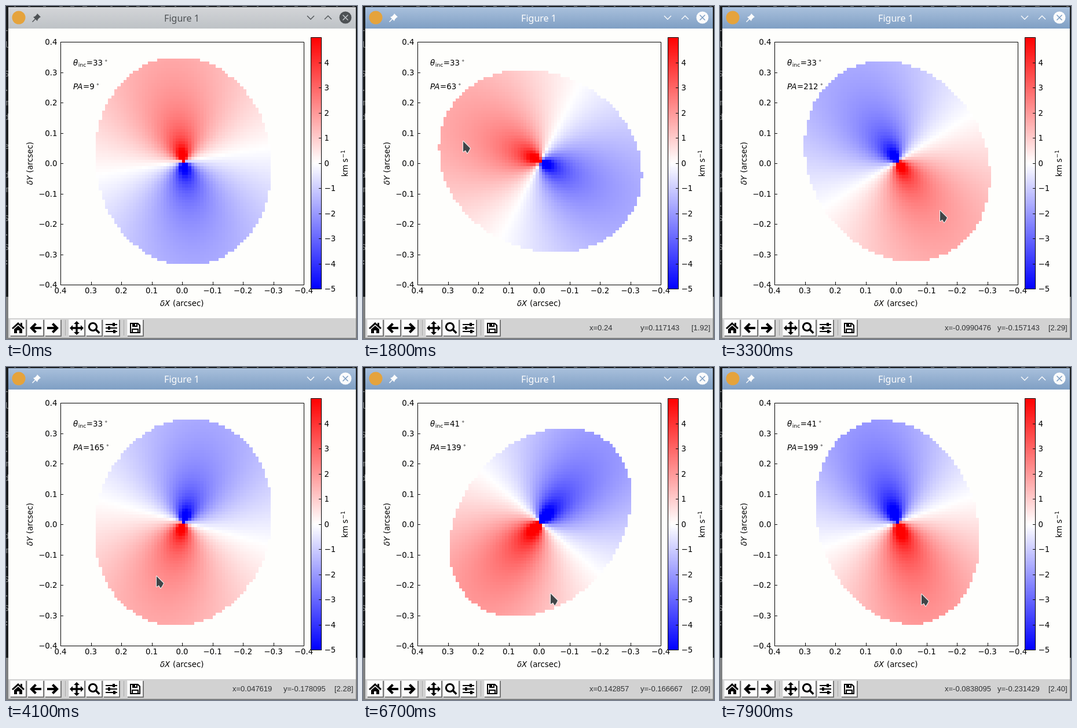
These frames come from a looping animation (606 by 576 pixels, 8000 ms). An HTML page with a canvas:

```html
<!DOCTYPE html>
<html lang="en">
<head>
<meta charset="utf-8">
<title>Figure 1</title>
<style>
html, body { margin: 0; width: 100%; height: 100%; overflow: hidden; background: #000; }
canvas { display: block; }
</style>
</head>
<body>
<canvas id="stage" width="606" height="576"></canvas>
<script>
const g = document.getElementById('stage').getContext('2d');
const LOOP = 8000, STEP = 100, FOCUS = 400, LAG = 150;
const SANS = '"DejaVu Sans", sans-serif';
const RAD = Math.PI / 180;
const CELL = 5.305, CX = 306.3, CY = 268.6, RADIUS = 180.75, PX_PER_ARCSEC = 525;

// Pointer during the drag: time, x, y
const DRAG = [
  [400, 284, 147.5], [900, 362, 160.5], [1100, 362, 160.5], [1250, 324, 150.5],
  [1800, 178, 210.5], [2200, 165, 275.5], [2600, 278, 354.5], [2800, 278, 354.5],
  [3450, 380, 354.5], [4100, 279, 365.5], [4500, 229, 359.5], [6700, 229, 359.5],
  [6850, 324, 392.5], [7100, 400, 366.5], [7700, 348, 393.5]
];
// Inclination set by scrolling: time, degrees
const TILT = [[4700, 33], [5200, 39], [6000, 43], [6500, 41]];

// Linear interpolation in rows of [time, ...values]
function at(rows, t) {
  const i = rows.findIndex(r => r[0] > t);
  if (i === 0) return rows[0].slice(1);
  if (i < 0) return rows[rows.length - 1].slice(1);
  const a = rows[i - 1], b = rows[i], f = (t - a[0]) / (b[0] - a[0]);
  return a.slice(1).map((v, j) => v + (b[j + 1] - v) * f);
}

// Blue – white – red over ±5 km/s
function colour(v) {
  const c = Math.round(255 * (1 - Math.min(Math.abs(v), 5) / 5));
  return v > 0 ? `rgb(255,${c},${c})` : `rgb(${c},${c},255)`;
}

const speed = (r, inc) => 1.83 * Math.sin(inc * RAD) / Math.sqrt(r / PX_PER_ARCSEC);

function rect(x, y, w, h, fill) {
  g.fillStyle = fill;
  g.fillRect(x, y, w, h);
}

function text(s, x, y, font, align = 'left', fill = '#000') {
  g.font = font;
  g.textAlign = align;
  g.fillStyle = fill;
  g.fillText(s, x, y);
}

function line(d, stroke, width = 1) {
  g.strokeStyle = stroke;
  g.lineWidth = width;
  g.stroke(new Path2D(d));
}

function shape(d, x, y, fill) {
  g.save();
  g.translate(x, y);
  g.fillStyle = fill;
  g.fill(new Path2D(d), 'evenodd');
  g.restore();
}

function disc(x, y, r, fill) {
  g.beginPath();
  g.arc(x, y, r, 0, 7);
  g.fillStyle = fill;
  g.fill();
}

// Runs of [string, style, scale, rise]; centred when asked
function formula(runs, x, y, centred) {
  const fonts = runs.map(([, style, k = 1]) => `${style} ${13.33 * k}px ${SANS}`);
  const widths = runs.map(([s], i) => (g.font = fonts[i], g.measureText(s).width + .5));
  if (centred) x -= widths.reduce((a, b) => a + b) / 2;
  runs.forEach(([s, , , rise = 0], i) => {
    text(s, x, y - rise, fonts[i]);
    x += widths[i];
  });
}

function upright(runs, x, y) {
  g.save();
  g.translate(x, y);
  g.rotate(-Math.PI / 2);
  formula(runs, 0, 0, true);
  g.restore();
}

function terminal() {
  const ink = '#85888a', font = '14px "DejaVu Sans Mono", monospace';
  rect(0, 0, 606, 576, '#1b1e20');
  rect(0, 503, 606, 73, '#7f8182');
  [...'-l S.md e dm.S.S:'].forEach((c, i) => text(c, -3, 47 + i * 25, font, 'left', ink));
  for (let i = 0; i < 26; i++) rect(14 + i * 23 + i * i % 11, 0, 3 + i * 7 % 6, 1, ink);
}

function titleBar(active) {
  const [top, low, ink] = active ? ['#a9c0dc', '#7f9fc4', '#fcfcfc'] : ['#d3d5d8', '#bec2c6', '#4d5154'];
  const bar = g.createLinearGradient(0, 2, 0, 39);
  bar.addColorStop(0, top);
  bar.addColorStop(1, low);
  rect(4, 2, 600, 37, bar);
  disc(22, 20, 11.5, '#e5a33c');
  shape('M2-7L8-1 6 0 3 3 2 6-1 3-6 8-7 7-2 2-5-1-2-2 1-5Z', 52, 20, ink);
  text('Figure 1', 303.5, 27, '16px "Noto Sans", sans-serif', 'center', ink);
  line('M520 17l6 6 6-6M550 23l6-6 6 6', ink, 1.4);
  disc(586, 20, 10.5, ink);
  line('M581.5 15.5l9 9m0-9l-9 9', low, 1.6);
}

const ICONS = [
  'M-11 0L0-10 4-6V-9H7V-4L11 0 9 2 0-6-9 2ZM-7 2L0-4 7 2V9H2V4H-2V9H-7Z',
  'M-10 0L-1-9 2-6-2-2H10V2H-2L2 6-1 9Z',
  'M10 0L1-9-2-6 2-2H-10V2H2L-2 6 1 9Z',
  'M0-12L5-7H1.7V-1.7H7V-5L12 0 7 5V1.7H1.7V7H5L0 12-5 7H-1.7V1.7H-7V5L-12 0-7-5V-1.7H-1.7V-7H-5Z',
  'M-2-10A8 8 0 1 0 2.5 4.5L8 10 10.5 7.5 5 2A8 8 0 0 0-2-10ZM-2-7A5 5 0 1 1-2 3 5 5 0 1 1-2-7Z',
  'M-10-7H2V-9H6V-7H10V-5H6V-3H2V-5H-10ZM-10-1H-6V-3H-2V-1H10V1H-2V3H-6V1H-10ZM-10 5H3V3H7V5H10V7H7V9H3V7H-10Z',
  'M-9-9H5L9-5V9H-9ZM-7-7V7H-6V1H6V7H7V-4L4-7V-2H-5V-7ZM0-7V-4H2V-7ZM-4 3V7H4V3Z'
];

function toolBar() {
  rect(4, 540, 600, 34, '#d2d2d2');
  ICONS.forEach((d, i) => {
    const x = 21 + 30 * i + 11 * Math.floor(i / 3);   // groups of three
    rect(x - 13, 543, 28, 29, '#777');
    rect(x - 14, 542, 27, 28, '#eee');
    rect(x - 13, 543, 26, 27, '#fcfcfc');
    shape(d, x, 557, '#000');
  });
  line('M102.5 543v27M203.5 543v27', '#aaa');
}

function axes() {
  const font = `13.33px ${SANS}`, minus = s => s.replace('-', '−');
  for (let i = 0; i <= 8; i++) {
    const p = 52.5 * i, s = minus(((4 - i) / 10).toFixed(1));
    text(s, 88.5, Math.round(67 + p), font, 'right');
    text(s, 94 + p, 497, font, 'center');
    line(`M94 ${Math.round(62 + p) + .5}h5M${Math.round(94 + p) + .5} 482v-5`, '#000');
  }
  line('M94.5 62.5h420v420h-420z', '#000');
  formula([['δX', 'italic'], [' (arcsec)', '']], 304, 519, true);
  upright([['δY', 'italic'], [' (arcsec)', '']], 46, 272);

  for (let y = 54; y < 489; y++) rect(526, y, 19, 1, colour(5 - (y - 54) / 43.5));
  for (let v = 4; v >= -5; v--) {
    const y = Math.round(271.5 - v * 43.5);
    text(minus(String(v)), 549.5, y + 5, font);
    line(`M545 ${y + .5}h-5`, '#000');
  }
  line('M526.5 54.5h18v435h-18z', '#000');
  upright([['km s', ''], ['−1', '', .7, 5]], 590, 272);
}

// Line-of-sight speed of an inclined rotating disc, cell by cell
function velocityMap(pa, inc) {
  const c = Math.cos(pa * RAD), s = Math.sin(pa * RAD), squash = Math.cos(inc * RAD);
  const edge = (mid, n) => Math.round(mid + (n - .5) * CELL);
  for (let j = -34; j <= 34; j++) for (let i = -34; i <= 34; i++) {
    const dx = -i * CELL, dy = -j * CELL + .001;
    const u = dx * s + dy * c, w = (dx * c - dy * s) / squash;
    const r = Math.hypot(u, w);
    if (r > RADIUS) continue;
    const x = edge(CX, i), y = edge(CY, j);
    rect(x, y, edge(CX, i + 1) - x, edge(CY, j + 1) - y, colour(speed(r, inc) * u / r));
  }
}

function status(x, y, inc) {
  const font = '13px "Liberation Sans", Arial, sans-serif', ink = '#303234';
  const coord = px => String(+(px / PX_PER_ARCSEC).toPrecision(6));
  const sx = coord(304 - x), long = sx.replace('-', '').length > 8;
  const value = speed(Math.hypot(x - CX, y - CY), inc);
  text('x=' + sx, long ? 388 : 391, 561, font, 'left', ink);
  text('y=' + coord(272 - y), 479, 561, font, 'left', ink);
  text(`[${value.toFixed(2)}]`, 599.5, 561, font, 'right', ink);
}

function pointer(x, y) {
  const d = 'M0 0V18L4 15.5 7 20.5 10 16 12 12Z';
  g.save();
  g.translate(x, y);
  g.lineJoin = 'round';
  line(d, '#f4f4f4', 2);
  g.restore();
  shape(d, x, y, '#414548');
}

function draw(t) {
  const active = t >= FOCUS;
  let [x, y] = at(DRAG, t);
  x = Math.round(x);
  y = Math.floor(y) + .5;
  let pa = active ? Math.atan2(304 - x, 272 - y) / RAD : 9;
  if (pa < -90) pa += 360;
  pa = Math.trunc(pa);
  const inc = Math.round(at(TILT, t)[0]);

  terminal();
  titleBar(active);
  rect(4, 39, 600, 501, '#fefefc');
  toolBar();
  velocityMap(pa, inc);
  axes();
  const degree = [' °', '', .7, 3];
  formula([['θ', 'italic'], ['inc', '', .7, -2], ['=' + inc, ''], degree], 116, 103);
  formula([['PA', 'italic'], ['=' + pa, ''], degree], 116, 144);
  if (active) {
    status(x, y, t > 6700 ? inc : 33);   // scrolling alone leaves the readout as it was
    const [px, py] = at(DRAG, t + LAG);
    pointer(Math.round(px), Math.round(py) - 1);
  }
}

const start = performance.now();
let last = -1;
function tick() {
  const t = Math.floor((performance.now() - start) % LOOP / STEP) * STEP;
  if (t !== last) draw(last = t);
  requestAnimationFrame(tick);
}
tick();
</script>
</body>
</html>
```
